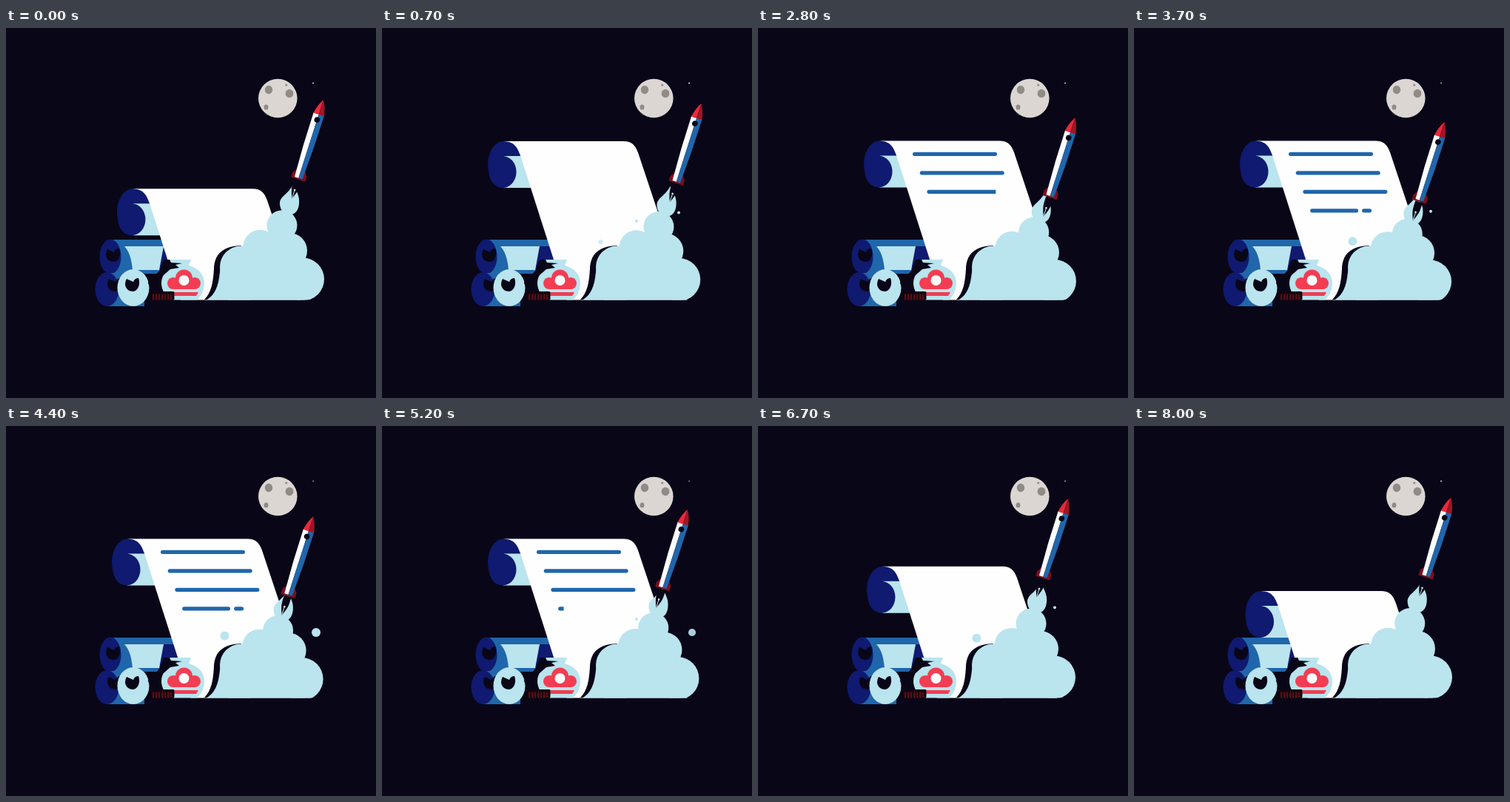
An HTML page for the animation above (8.1 s loop, 500 by 500 pixels).

```html
<!DOCTYPE html>
<html lang="en">
<head>
<meta charset="utf-8">
<title>Scroll and rocket pen</title>
<style>
  html, body { margin: 0; width: 100%; height: 100%; overflow: hidden; background: #090617; }
  svg { display: block; width: 100vw; height: 100vh; }
  .bg { fill: #090617; }
  .navy { fill: #0f1a70; }
  .blue { fill: #2066ab; }
  .ice { fill: #bae4ee; }
  .red { fill: #f23d52; }
  .white { fill: #fefeff; }
  .crater { fill: #918b88; }
</style>
</head>
<body>
<svg viewBox="0 0 500 500">
  <defs>
    <clipPath id="floor"><rect width="500" height="367.5"/></clipPath>
    <path id="hole" d="M-8 -8L1 -4Q3 -9 8 -9C11 -2 8 8 1 9C-6 9 -10 4 -10 -1Q-10 -5 -8 -8Z"/>
  </defs>
  <rect class="bg" width="500" height="500"/>

  <circle id="star" class="white" cx="415" cy="74.5" r=".9"/>
  <g id="moon">
    <circle cx="367.3" cy="95" r="26.3" fill="#dbd6d2"/>
    <ellipse class="crater" cx="355" cy="83.5" rx="5.2" ry="5.8"/>
    <ellipse class="crater" cx="383" cy="88.5" rx="5.4" ry="5.8"/>
    <ellipse class="crater" cx="351.5" cy="107" rx="3" ry="3.5"/>
    <circle class="crater" cx="378.7" cy="77" r="1.6"/>
  </g>

  <g id="rolls">
    <path class="blue" d="M140 286H234V295H213L207 332H140Z"/>
    <path class="navy" d="M212 295H234V314H213L207 327Z"/>
    <path class="ice" d="M160 295H213L207 327H171Q169 304 160 295Z"/>
    <ellipse class="navy" cx="141" cy="309" rx="14.5" ry="23.5"/>
    <use href="#hole" class="bg" x="145" y="307"/>
    <path class="blue" d="M136 331H187V376H136Z"/>
    <ellipse class="navy" cx="136.5" cy="353" rx="16" ry="23"/>
    <use href="#hole" class="bg" x="147" y="347"/>
    <ellipse class="ice" cx="172" cy="351" rx="21.5" ry="25"/>
    <use href="#hole" class="bg" x="171" y="347"/>
  </g>

  <g clip-path="url(#floor)">
    <g id="sheet">
      <ellipse class="navy" cx="164" cy="184" rx="21" ry="31.5"/>
      <path class="navy" d="M164 152.5H184L192 174H164Z"/>
      <path class="ice" d="M165 172.5H194L204 215.5H164Z"/>
      <ellipse class="navy" cx="163" cy="194" rx="18.5" ry="21.5"/>
      <path class="white" d="M164 152.5H326C338 152.5 342 158 346 168L414 372H251L187 172C182 158 177 153 164 152.5Z"/>
    </g>
  </g>
  <g id="lines" class="blue"></g>

  <path class="bg" d="M318 294C292 295 282 306 281 325C280 345 277 358 268 367H290L318 310Z"/>
  <path class="ice" d="M318 295C298 298 291 314 289 330C287 350 282 361 271 367.500H330V295Z"/>
  <g id="cloud" class="ice" clip-path="url(#floor)">
    <path d="M300 318L340 285H385L404 325V368H300Z"/>
  </g>
  <g id="drops" class="ice"></g>
  <path id="flame" class="ice" d="M0 16C-9 14 -13 8 -13 0C-13 -9 -2 -12 5 -25C11 -15 14 -8 13 1C12 10 8 15 0 16Z"/>

  <g id="rocket">
    <path class="bg" d="M-5 113H5V121C5 129 2 135 0 140C-2 135 -5 129 -5 121Z"/>
    <path d="M0 139V129" stroke="#d6eef3" stroke-width=".9"/>
    <circle cx="0" cy="128" r="1.300" fill="#d6eef3"/>
    <path d="M-6 100L-10 106V113H10V106L6 100Z" fill="#7d0f1c"/>
    <path class="white" d="M-7.500 20H0V111H-5.500Q-8 65 -7.500 20Z"/>
    <path class="blue" d="M0 20H7.500Q8 65 5.500 111H0Z"/>
    <path d="M0 0Q-6 10 -7.500 21H0Z" fill="#ea2a3b"/>
    <path d="M0 0Q6 10 7.500 21H0Z" fill="#a01626"/>
    <circle class="bg" cx="0" cy="28.500" r="3.800"/>
  </g>

  <g id="bottle">
    <path class="bg" d="M192 345C194 335 204 335 209 325L213 313H224V335L216 358H198Z"/>
    <path class="ice" d="M217 313H250L247 321C262 325 268 335 268 345C268 355 264 362 258 367.500H221C214 361 210 352 210 345C210 335 216 327 226 322Z"/>
    <path class="bg" d="M213 313H221L223 317L238 318L229 320L234 324L222 326L213 334Z"/>
    <g class="red">
      <circle cx="240.500" cy="338" r="11.500"/>
      <circle cx="226" cy="345" r="8"/>
      <circle cx="255" cy="345" r="8"/>
      <path d="M226 342H255V353H226ZM222 357H260L257 362H224Z"/>
    </g>
    <circle class="white" cx="240.500" cy="341" r="7"/>
    <rect x="195" y="356" width="32.500" height="12" rx="2" fill="#10050f"/>
    <path d="M198 363.500H226" stroke="#5d0d18" stroke-width="8" stroke-dasharray="2.200 1.800"/>
  </g>
</svg>
<script>
const LOOP = 8100, STEP = 100, DROP_CYCLE = 2700;
const LOW = 227, HIGH = 152.5;
const $ = id => document.getElementById(id);
const set = (el, attrs) => { for (const k in attrs) el.setAttribute(k, attrs[k]); };
const add = (id, tag) => $(id).appendChild(
  document.createElementNS('http://www.w3.org/2000/svg', tag));
const clamp = u => Math.max(0, Math.min(1, u));
const easeInOut = u => u < .5 ? 4 * u ** 3 : 1 - 4 * (1 - u) ** 3;

// The rocket tip drifts round a closed curve through these points.
const path = [
  { t: 0, x: 429, y: 97 },
  { t: 700, x: 431.5, y: 102 },
  { t: 2000, x: 435, y: 113 },
  { t: 3700, x: 419.5, y: 127 },
  { t: 5200, x: 413, y: 112.5 },
  { t: 6700, x: 419, y: 98 }
];

function tipAt(t) {
  const n = path.length;
  const point = i => {
    const p = path[(i + n) % n];
    return { ...p, t: p.t + Math.floor(i / n) * LOOP };
  };
  let i = n - 1;
  while (path[i].t > t) i--;
  const [a, b, c, d] = [-1, 0, 1, 2].map(k => point(i + k));
  const h = c.t - b.t, u = (t - b.t) / h, v = 1 - u;
  const blend = k => {
    const m0 = (c[k] - a[k]) / (c.t - a.t) * h;
    const m1 = (d[k] - b[k]) / (d.t - b.t) * h;
    return b[k] * (1 + 2 * u) * v * v + m0 * u * v * v
      + c[k] * u * u * (3 - 2 * u) - m1 * u * u * v;
  };
  return { x: blend('x'), y: blend('y') };
}

// Smoke puffs follow the rocket, less and less towards the ground.
const puffs = [
  { x: 371, y: 272.5, r: 20.5, pull: .39 },
  { x: 382.5, y: 302.5, r: 24, pull: .1 },
  { x: 400.5, y: 341, r: 29, pull: .1 },
  { x: 343, y: 297, r: 23, pull: .08 },
  { x: 317.5, y: 323, r: 28.5, pull: 0 }
].map(p => ({ ...p, el: add('cloud', 'circle') }));

const drops = [
  { x: 401, y: 250, r: 2, from: 400, to: 1700, rise: 10 },
  { x: 419, y: 279, r: 6, from: 1500, to: 2600, rise: 0 },
  { x: 295.5, y: 289, r: 6, from: 620, to: 2080, rise: 10 },
  { x: 344, y: 261, r: 2, from: 600, to: 900, rise: 0 },
  { x: 344, y: 261, r: 2, from: 2400, to: 2590, rise: 0 }
].map(d => ({ ...d, el: add('drops', 'circle') }));

// Four text rows; the last one has a gap and a short dash.
const rows = [0, 1, 2, 3].map(i => ({
  x: 209 + 9.7 * i,
  y: 170.3 + 25.5 * i,
  parts: i < 3 ? [[0, 114]] : [[0, 65], [70, 13]],
  el: add('lines', 'path')
}));

function bar(x, y, shown, full) {
  if (shown <= 0) return '';
  const r = 2.6, top = y - r, low = y + r;
  const start = `M${x + r} ${top}A${r} ${r} 0 0 0 ${x + r} ${low}`;
  return shown >= full
    ? `${start}H${x + full - r}A${r} ${r} 0 0 0 ${x + full - r} ${top}Z`
    : `${start}H${x + Math.max(shown, r)}V${top}Z`;
}

// Rows on the sheet: written one by one, then wiped backwards.
const written = t => t < 4300 ? (t - 900) / 675 : 3 + (5230 - t) / 335;

function sheetTop(t) {
  const sinceLift = (t + 400) % LOOP;
  const lift = easeInOut(clamp(sinceLift / 1250));
  const fall = easeInOut(clamp((sinceLift - 6600) / 1000));
  return LOW + (HIGH - LOW) * (lift - fall);
}

function draw(t) {
  const drop = sheetTop(t) - HIGH;
  set($('sheet'), { transform: `translate(${drop * .107} ${drop})` });
  set($('star'), { opacity: .75 + .25 * Math.cos((t - 1200) / LOOP * 2 * Math.PI) });

  const tip = tipAt(t), dx = tip.x - 424, dy = tip.y - 112;
  set($('rocket'), { transform: `translate(${tip.x} ${tip.y}) rotate(17.7)` });
  set($('flame'), { transform: `translate(${380 + .6 * dx} ${243.5 + .45 * dy})` });
  for (const p of puffs) set(p.el, { cx: p.x + p.pull * dx, cy: p.y + p.pull * dy, r: p.r });

  for (const d of drops) {
    const u = clamp((t % DROP_CYCLE - d.from) / (d.to - d.from));
    const size = clamp(3 * Math.sin(Math.PI * u));
    set(d.el, { cx: d.x, cy: d.y - d.rise * u * u, r: d.r * size, opacity: .4 + .6 * size });
  }

  const count = written(t);
  rows.forEach((row, i) => {
    const [from, width] = row.parts[row.parts.length - 1];
    const shown = clamp(count - i) * (from + width);
    set(row.el, { d: row.parts.map(([a, w]) => bar(row.x + a, row.y, shown - a, w)).join('') });
  });
}

const start = performance.now();
function frame() {
  const t = (performance.now() - start) % LOOP;
  draw(Math.floor(t / STEP) * STEP);
  requestAnimationFrame(frame);
}
draw(0);
requestAnimationFrame(frame);
</script>
</body>
</html>
```
